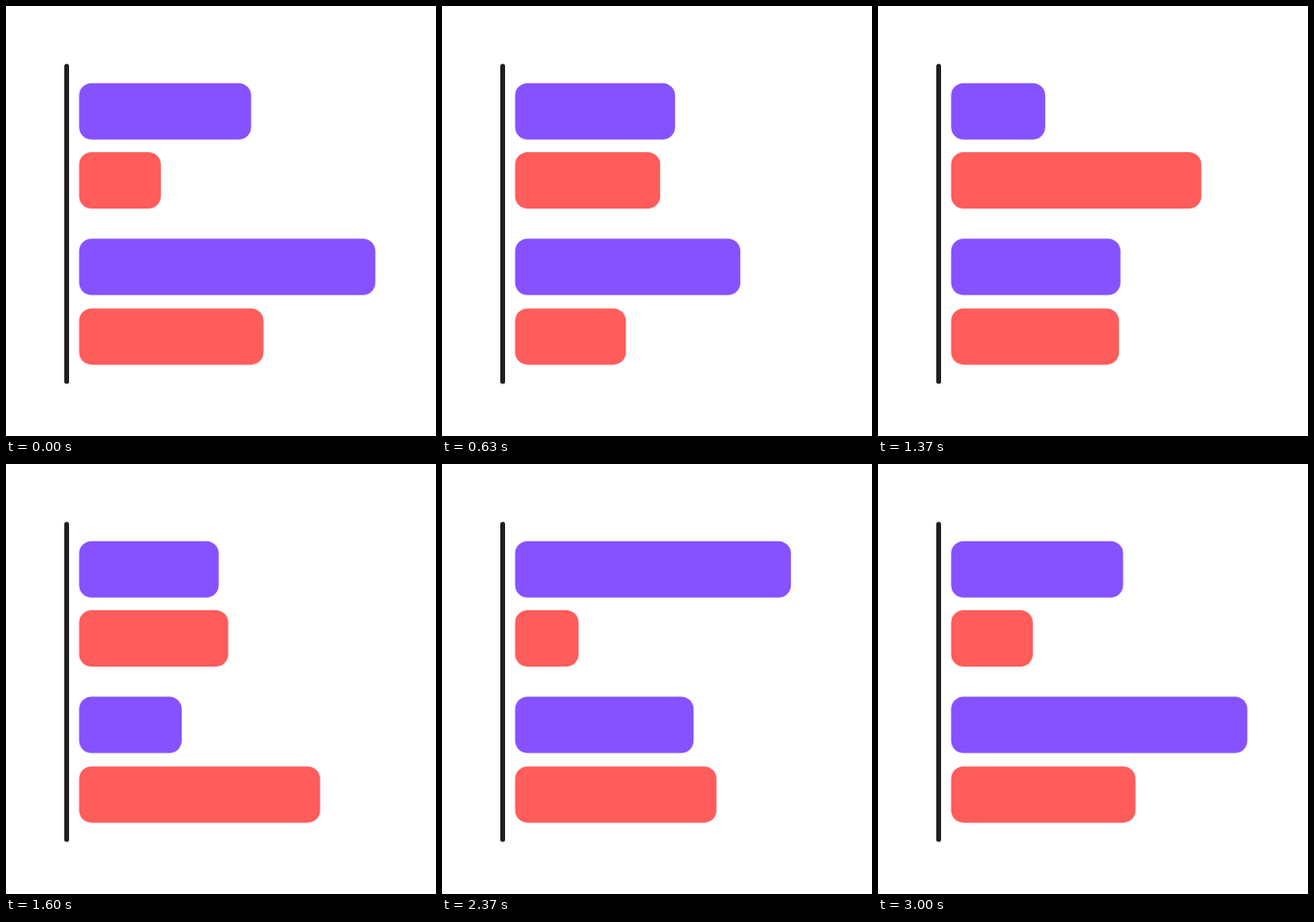
Recreate the animation shown at these times as an HTML page. Size 450 by 450 pixels, loop 3.03 s.

```html
<!DOCTYPE html>
<html lang="en">
<head>
<meta charset="utf-8">
<title>Bar chart</title>
<style>
  html, body { margin: 0; width: 100%; height: 100%; overflow: hidden; background: #fff; }
  svg { display: block; width: 100%; height: 100%; }
</style>
</head>
<body>
<svg id="chart" viewBox="0 0 450 450">
  <path d="M63.5 63V393" stroke="#1f1f1f" stroke-width="5" stroke-linecap="round"/>
</svg>
<script>
const LOOP = 3030, MOVE = 27, LEFT = 76.5;
const PURPLE = '#8652ff', RED = '#ff5c5c';

// delay in ticks of 1/30 s; stops are the right edges visited in turn
const bars = [
  { y: 80.8, color: PURPLE, delay: 9, stops: [256.5, 169.8, 374.5, 256.5] },
  { y: 153, color: RED, delay: 6, stops: [162, 355.5, 138.3, 162] },
  { y: 243.5, color: PURPLE, delay: 3, stops: [386.5, 275.6, 162.7, 386.5] },
  { y: 316.4, color: RED, delay: 0, stops: [269.5, 179.8, 340.9, 269.5] }
];

const chart = document.getElementById('chart');
for (const bar of bars) {
  bar.rect = document.createElementNS('http://www.w3.org/2000/svg', 'rect');
  const attrs = { x: LEFT, y: bar.y, height: 59, rx: 13, fill: bar.color };
  for (const key in attrs) bar.rect.setAttribute(key, attrs[key]);
  chart.append(bar.rect);
}

const bezier = (s, p1, p2) =>
  3 * s * (1 - s) ** 2 * p1 + 3 * s * s * (1 - s) * p2 + s ** 3;

function ease(t) {
  let lo = 0, hi = 1;
  for (let i = 0; i < 24; i++) {
    const mid = (lo + hi) / 2;
    if (bezier(mid, 0.73, 0.34) < t) lo = mid; else hi = mid;
  }
  return bezier(lo, 0, 0.93);
}

function rightEdge({ delay, stops }, tick) {
  const pos = Math.min(Math.max((tick - delay) / MOVE, 0), 3);
  const i = Math.min(Math.floor(pos), 2);
  return stops[i] + (stops[i + 1] - stops[i]) * ease(pos - i);
}

function draw() {
  const tick = Math.floor((performance.now() % LOOP) * 0.03 + 0.2);
  for (const bar of bars) bar.rect.setAttribute('width', rightEdge(bar, tick) - LEFT);
  requestAnimationFrame(draw);
}
draw();
</script>
</body>
</html>
```
